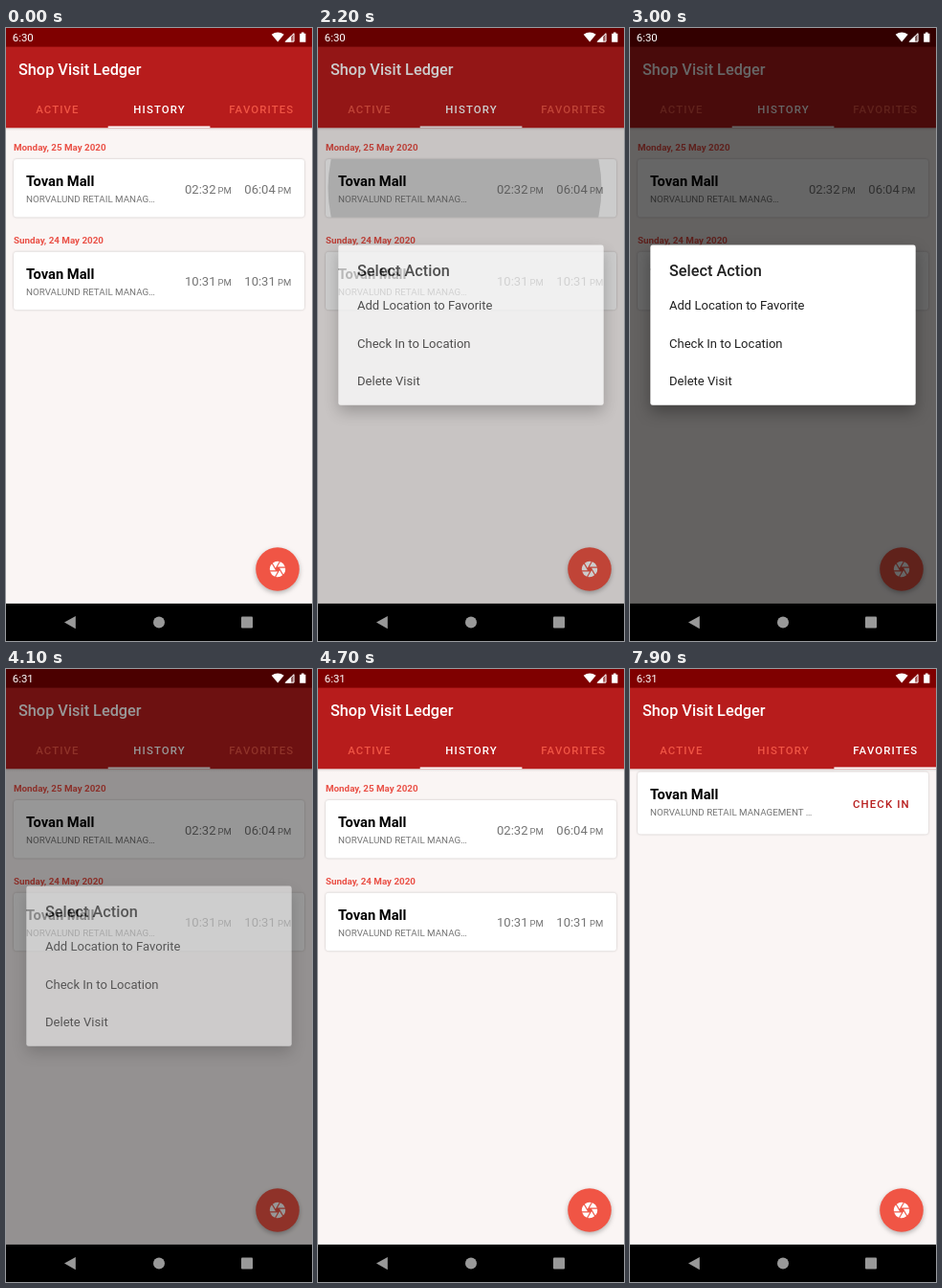
Recreate the animation shown at these times as an HTML page. Size 320 by 640 pixels, loop 8 s.

```html
<!DOCTYPE html>
<html lang="en">
<head>
<meta charset="utf-8">
<title>Visit log</title>
<style>
  html, body { margin: 0; width: 100%; height: 100%; overflow: hidden; background: #000; }
  svg { display: block; width: 100vw; height: 100vh; font-family: Roboto, Arial, sans-serif; }
  .title { font-size: 16.3px; font-weight: 500; }
  .tab { font-size: 11.4px; font-weight: 500; letter-spacing: 1.12px; }
  .date { font-size: 9.8px; font-weight: 700; fill: #ea5046; }
  .place { font-size: 14.7px; font-weight: 700; fill: #000; }
  .owner { font-size: 9.8px; fill: #757575; }
  .time { font-size: 13.06px; fill: #757575; }
  .half { font-size: 9.5px; fill: #757575; }
  .item { font-size: 13.06px; fill: #212121; }
  .card { fill: #fff; filter: drop-shadow(0 .8px .9px rgba(0,0,0,.22)); }
  .fab { fill: #f05545; filter: drop-shadow(0 2.6px 2.8px rgba(0,0,0,.28)); }
  .sheet { fill: #fff; filter: drop-shadow(0 7px 8px rgba(0,0,0,.32)); }
</style>
</head>
<body>
<svg viewBox="0 0 320 640" preserveAspectRatio="none">
  <defs>
    <clipPath id="cardClip"><rect x="8" y="137" width="304" height="60.5" rx="3.3"/></clipPath>
    <linearGradient id="barShade" x2="0" y2="1">
      <stop offset="0" stop-opacity=".1"/>
      <stop offset="1" stop-opacity="0"/>
    </linearGradient>
  </defs>

  <rect width="320" height="640" fill="#faf5f4"/>
  <g id="history"></g>
  <g id="favorites">
    <rect class="card" x="8" y="107.6" width="304" height="65" rx="3.3"/>
    <text class="place" x="21" y="136.3">Tovan Mall</text>
    <text class="owner" x="21" y="153">NORVALUND RETAIL MANAGEMENT …</text>
    <text class="tab" x="233" y="144.7" fill="#b71c1c">CHECK IN</text>
  </g>

  <rect y="104.3" width="320" height="3" fill="url(#barShade)"/>
  <rect width="320" height="104.3" fill="#b71c1c"/>
  <rect width="320" height="19.6" fill="#7f0000"/>
  <text class="title" x="13" y="49" fill="#fff">Shop Visit Ledger</text>
  <g id="tabs" text-anchor="middle"></g>
  <rect id="marker" y="102.5" width="106.7" height="1.8" fill="#fff"/>

  <circle class="fab" cx="284" cy="565" r="22.8"/>
  <g id="shutter" fill="#fff" transform="translate(284 565) scale(.8157) translate(-12 -12)"></g>

  <rect id="dim" width="320" height="601"/>
  <g id="dialog">
    <rect class="sheet" x="21.3" y="226.6" width="277.4" height="167.2" rx="2.4"/>
    <text class="title" x="41" y="259.2" fill="#212121">Select Action</text>
    <text class="item" x="41" y="294.4">Add Location to Favorite</text>
    <text class="item" x="41" y="333.5">Check In to Location</text>
    <text class="item" x="41" y="372.7">Delete Visit</text>
  </g>

  <g fill="#fff">
    <text id="clock" x="6.8" y="14.2" font-size="11.4"></text>
    <path d="M284.2 14.6L277.7 6.8Q284.2 2.2 290.7 6.8Z"/>
    <path d="M301.5 4.6V14.6H291.5Z" fill-opacity=".3"/>
    <path d="M298.2 7.9V14.6H291.5Z"/>
    <path d="M301 5.8V14.1H292.7Z" fill="none" stroke="#fff"/>
    <path d="M307.2 5.7H309V4.5H311.6V5.7H313.4V14.7H307.2Z"/>
  </g>

  <rect y="600.9" width="320" height="39.1" fill="#000"/>
  <g fill="#999">
    <path d="M61 620.6L72.8 614V627.2Z"/>
    <circle cx="160" cy="620.6" r="6"/>
    <rect x="246" y="614.6" width="12" height="12" rx="1"/>
  </g>
</svg>
<script>
const LOOP = 8000, STEP = 100;
const el = id => document.getElementById(id);
const clamp = v => Math.min(1, Math.max(0, v));
const span = (t, start, length) => clamp((t - start) / length);

function visit(y, date, arrive, leave) {
  const stamp = (x, value) =>
    `<text class="time" x="${x}" y="172.5">${value}</text><text class="half" x="${x + 34.6}" y="172.5">PM</text>`;
  const ripple = y ? '' : '<g clip-path="url(#cardClip)"><circle id="ripple" cx="153.5" cy="167"/></g>';
  return `<g transform="translate(0 ${y})">
    <text class="date" x="8" y="127.9">${date}</text>
    <rect class="card" x="8" y="137" width="304" height="60.5" rx="3.3"/>${ripple}
    <text class="place" x="21" y="165.4">Tovan Mall</text>
    <text class="owner" x="21" y="182">NORVALUND RETAIL MANAG…</text>
    ${stamp(187, arrive)}${stamp(249.3, leave)}</g>`;
}

el('history').innerHTML =
  visit(0, 'Monday, 25 May 2020', '02:32', '06:04') +
  visit(96.8, 'Sunday, 24 May 2020', '10:31', '10:31');

el('tabs').innerHTML = ['ACTIVE', 'HISTORY', 'FAVORITES']
  .map((name, i) => `<text class="tab" x="${53.9 + i * 106.7}" y="89.2">${name}</text>`).join('');
const tabs = [...el('tabs').children];

el('shutter').innerHTML = Array.from({ length: 6 }, (_, i) =>
  `<path transform="rotate(${i * 60} 12 12)" d="M9.4 10.5L14.17 2.24A10 10 0 0 0 5.68 4.25L9.34 10.6Z"/>`).join('');

// cubic-bezier(.4, 0, .2, 1), solved by bisection
function standardEase(x) {
  let low = 0, high = 1;
  for (let i = 0; i < 20; i++) {
    const s = (low + high) / 2, r = 1 - s;
    if (1.2 * r * r * s + .6 * r * s * s + s ** 3 < x) low = s;
    else high = s;
  }
  return low * low * (3 - 2 * low);
}

function draw(t) {
  const dim = .6 * (span(t, 2127, 220) - span(t, 4030, 220));
  const sheet = span(t, 2127, 102) - span(t, 4030, 150);
  el('dim').setAttribute('opacity', dim);
  el('dialog').setAttribute('opacity', sheet);
  el('dialog').setAttribute('visibility', sheet > 0 ? 'visible' : 'hidden');

  const spread = span(t, 2200, 300);
  el('ripple').setAttribute('r', 143 + 60 * spread);
  el('ripple').setAttribute('opacity', t < 2200 ? 0 : .16 * (1 - spread));

  const page = 320 * (1 - (1 - span(t, 6185, 200)) ** 5);
  el('history').setAttribute('transform', `translate(${-page} 0)`);
  el('favorites').setAttribute('transform', `translate(${320 - page} 0)`);
  el('favorites').setAttribute('visibility', t < 6300 ? 'hidden' : 'visible');
  el('marker').setAttribute('x', 106.7 * (1 + standardEase(span(t, 6161, 300))));

  const active = t < 6200 ? 1 : 2;
  tabs.forEach((tab, i) => tab.setAttribute('fill', i === active ? '#fff' : '#f05545'));
  el('clock').textContent = t < 3500 ? '6:30' : '6:31';
}

const start = performance.now();
function tick(now) {
  const t = Math.max(0, now - start) % LOOP;
  draw(Math.floor(t / STEP) * STEP);
  requestAnimationFrame(tick);
}
draw(0);
requestAnimationFrame(tick);
</script>
</body>
</html>
```
